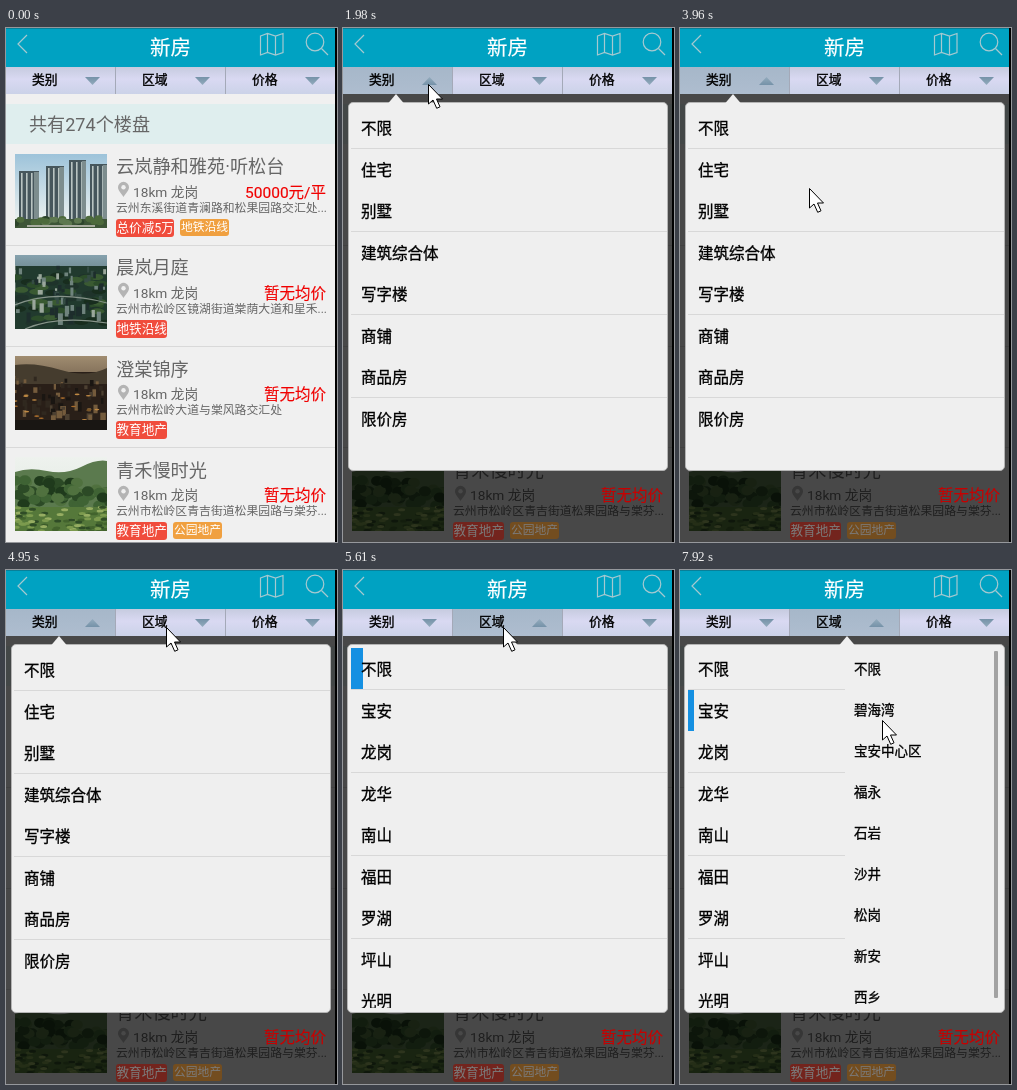
An HTML page for the animation above (8000 ms loop, 331x514 px).

```html
<!DOCTYPE html>
<html lang="zh-CN">
<head>
<meta charset="utf-8">
<title>新房</title>
<style>
html, body { margin: 0; width: 100%; height: 100%; overflow: hidden; }
#stage {
  position: absolute; left: 0; top: 0; width: 331px; height: 514px; overflow: hidden;
  background: #f0f0f0; color: #666;
  font-family: Roboto, "Noto Sans CJK SC", "Noto Sans CJK", sans-serif;
}
#stage * { box-sizing: border-box; }
#stage div, #stage svg, #stage span { position: absolute; }
.t { line-height: 20px; white-space: nowrap; }
.anim, .tab::before, .menu, .sub, .mark, .region li::after { animation: 8s step-end infinite; }

.head { left: 0; top: 0; width: 331px; height: 39px; background: #00a2c2; border-top: 1px solid #087f98; }
.head .t { left: 144px; top: 9px; font-size: 20.5px; color: #fff; -webkit-text-stroke: .2px; }
.head svg { left: 0; top: -1px; fill: none; stroke: #a6c9d0; stroke-width: 1.2; }

.tab { top: 39px; height: 27px; background: linear-gradient(#c6cbdf, #d9d9f2 45%, #cbd2e8); border-right: 1px solid #a4a9b8; }
.tab::before { content: ""; position: absolute; inset: 0; background: linear-gradient(#a6b7c9, #aebdcf); opacity: 0; }
.tab .t { left: 26px; top: 3px; font-size: 12.8px; color: #000; -webkit-text-stroke: .35px; }
.tab i { position: absolute; left: 79px; top: 10px; width: 15px; height: 8px; background: linear-gradient(#7592a8, #93abbd); clip-path: polygon(0 0, 100% 0, 50% 100%); }
.tab1::before { animation-name: press1; }
.tab1 i { animation-name: flip1; }
.tab2::before { animation-name: press2; }
.tab2 i { animation-name: flip2; }
@keyframes press1 { 0%, 66% { opacity: 0 } 16.5% { opacity: 1 } }
@keyframes press2 { 0% { opacity: 0 } 66% { opacity: 1 } }
@keyframes flip1 { 0%, 66% { transform: none } 20.625% { transform: scaleY(-1) } }
@keyframes flip2 { 0% { transform: none } 66% { transform: scaleY(-1) } }

.count { left: 0; top: 76px; width: 329px; height: 40px; background: #dfeeee; }
.count .t { left: 23px; top: 11px; font-size: 18.1px; }

.row { left: 0; width: 329px; height: 101.3px; border-bottom: 1px solid #d9d9d9; }
.photo { left: 9px; top: 9px; width: 92px; height: 74px; }
.name { left: 110px; top: 12.5px; font-size: 18.2px; }
.pin { left: 111px; top: 36.5px; }
.dist { left: 127px; top: 37px; font-size: 13.7px; }
.addr { left: 110px; top: 53px; font-size: 11.86px; }
.hot { z-index: 2; }
.price { --shade: .83; right: 9px; top: 38px; font-size: 15.5px; color: #f00000; -webkit-text-stroke: .15px; }
.tags { --shade: .48; left: 110px; top: 74px; display: flex; gap: 6px; }
#stage .tags span { position: static; height: 18px; line-height: 18px; padding: 0 .5px; border-radius: 3px; font-size: 12.6px; color: #fff; background: #f04c3c; white-space: nowrap; }
#stage .tags span + span { height: 17px; line-height: 17px; font-size: 11.8px; background: #f0a040; }
.row3 .hot { animation-name: hot3; }
.row4 .hot { animation-name: hot4; }
@keyframes hot3 { 0% { filter: none } 24.75% { filter: brightness(var(--shade)) } }
@keyframes hot4 { 0%, 66% { filter: none } 24.75%, 70.125% { filter: brightness(var(--shade)) } }

.dim { left: 0; top: 66px; width: 329px; height: 0; z-index: 1; background: rgba(0, 0, 0, .7); animation-name: dim; }
@keyframes dim { 0% { height: 0 } 24.75%, 70.125% { height: 448px } 66% { height: 345px } }

.menu { left: 0; top: 66px; width: 329px; height: 448px; z-index: 3; opacity: 0; transform-origin: 0 0; }
.panel { left: 5px; top: 8px; width: 320px; height: 369px; background: #efefef; border: 1px solid #b4b4b4; border-radius: 5px; }
.tip { top: 0; width: 16px; height: 9.5px; background: #efefef; clip-path: polygon(50% 0, 100% 100%, 0 100%); }
.menu ul { position: absolute; left: 8px; top: 13px; width: 316px; height: 360px; margin: 0; padding: 0; list-style: none; overflow: hidden; }
.menu li { position: relative; height: 41.5px; line-height: 44.5px; padding-left: 10px; font-size: 15.5px; color: #000; -webkit-text-stroke: .3px; }
.menu li::after { position: absolute; left: 0; bottom: 0; width: 316px; height: 1px; background: #d8d8d8; }
.open li:nth-child(odd)::after { content: ""; }
.squash li:nth-child(n+2):nth-child(-n+5)::after { content: ""; }
.kind { animation-name: kind; }
.squash { animation-name: squash; transform: scaleY(.77); }
.region { animation-name: region; }
.region .panel { left: 4px; width: 321px; }
.region ul { top: 12px; }
.region li::after { animation-name: narrow; }
.region .mark { left: 8px; top: 12px; width: 12px; height: 41px; background: #1590e2; animation-name: mark; }
.region .sub { left: 0; top: 0; width: 329px; height: 448px; opacity: 0; animation-name: sub; }
.sub ul { left: 165px; width: 149px; }
.sub li { height: 41px; line-height: 43px; padding-left: 9px; font-size: 13.5px; }
#stage .sub li::after { content: none; }
.bar { left: 314px; top: 15px; width: 4px; height: 347px; border-radius: 1px; background: #a2a2a2; }
@keyframes kind { 0%, 66% { opacity: 0 } 24.75% { opacity: 1 } }
@keyframes squash { 0%, 70.125% { opacity: 0 } 66% { opacity: 1 } }
@keyframes region { 0% { opacity: 0 } 70.125% { opacity: 1 } }
@keyframes sub { 0% { opacity: 0 } 86.625% { opacity: 1 } }
@keyframes narrow { 0% { width: 316px } 86.625% { width: 157px } }
@keyframes mark { 0% { top: 12px; width: 12px } 86.625% { top: 54px; width: 6px } }

.edge { right: 0; top: 0; width: 2px; height: 514px; z-index: 4; background: #000; }
.cursor { left: 0; top: 0; z-index: 5; overflow: visible; animation-name: cursor; }
@keyframes cursor {
  0% { transform: translate(-40px, -40px) }
  8.25% { transform: translate(58px, 44px) }
  12.375% { transform: translate(85px, 56px) }
  28.875% { transform: translate(155px, 68px) }
  33% { transform: translate(160px, 65px) }
  37.125% { transform: translate(139px, 61px) }
  41.25% { transform: translate(176px, 79px) }
  45.375% { transform: translate(174px, 205px) }
  49.5% { transform: translate(129px, 160px) }
  53.625% { transform: translate(112px, 254px) }
  57.75% { transform: translate(96px, 65px) }
  61.875% { transform: translate(160px, 57px) }
  74.25% { transform: translate(127px, 102px) }
  78.375% { transform: translate(88px, 132px) }
  82.5% { transform: translate(74px, 144px) }
  90.75% { transform: translate(82px, 154px) }
  94.875% { transform: translate(202px, 143px) }
  99% { transform: translate(202px, 150px) }
}
</style>
</head>
<body>
<div id="stage">
  <div class="head">
    <span class="t">新房</span>
    <svg width="331" height="38">
      <path d="M21 7l-9 9 9 9"/>
      <path d="M254.500 8l7-2.500 8 2.500 7.500-2.500v19l-7.500 2.500-8-2.500-7 2.500zM261.500 5.500v19M269.500 8v19"/>
      <circle cx="309" cy="14" r="8.800"/><path d="M315.500 20.500l6.500 6.500"/>
    </svg>
  </div>
  <div class="count"><span class="t">共有274个楼盘</span></div>
  <div class="dim anim"></div>
  <div class="edge"></div>
  <svg class="cursor anim" width="16" height="26">
    <path d="M.5 .5V20L5 16l3.700 8.300 3.300-1.500L8.500 15H14.500z" fill="#fff" stroke="#000"/>
  </svg>
</div>
<script>
const stage = document.getElementById('stage');
const add = html => stage.insertAdjacentHTML('beforeend', html);

// Seeded scatter of small shapes
function scatter(n, seed, shape) {
  const rnd = () => (seed = (seed * 16807) % 2147483647) / 2147483647;
  let out = '';
  for (let i = 0; i < n; i++) out += shape(rnd, i / n);
  return out;
}
const rect = (x, y, w, h, fill) => `<rect x="${x}" y="${y}" width="${w}" height="${h}" fill="${fill}"/>`;
const blob = (x, y, rx, ry, fill) => `<ellipse cx="${x}" cy="${y}" rx="${rx}" ry="${ry}" fill="${fill}"/>`;
const pick = (list, r) => list[Math.floor(r() * list.length)];
const sky = (id, top, low) => `<linearGradient id="${id}" x2="0" y2="1"><stop stop-color="${top}"/>
  <stop offset="1" stop-color="${low}"/></linearGradient>` + rect(0, 0, 92, 74, `url(#${id})`);

// A dark block with pale vertical balcony strips
function tower(x, y, w) {
  let out = rect(x, y, w, 68 - y, '#46565c');
  for (let i = 2; i < w - 2; i += 5) out += rect(x + i, y + 2, 1.6, 66 - y, '#b9c4c2');
  return out + rect(x + w * .75, y + 1, w * .25, 67 - y, '#7d8d8e');
}
const town = (n, seed, tones, y0) => scatter(n, seed, (r, k) => {
  const y = y0 + k * (66 - y0), s = .5 + k;
  return rect(r() * 92 - 3, y - 4 * s, 2 + 3 * s * r(), 3 + 6 * s * r(), pick(tones, r));
});
const leaves = (n, seed, y, h, rx, ry, tones) =>
  scatter(n, seed, r => blob(r() * 92, y + r() * h, rx, ry, pick(tones, r)));

const photos = [
  sky('s1', '#9dc3da', '#f4f6f2') + tower(4, 17, 20) + tower(31, 12, 18) + tower(54, 6, 17) + tower(75, 10, 17) +
    rect(0, 65, 92, 9, '#3d5537') + leaves(24, 7, 64, 6, 4, 3, ['#2c442b', '#4d6a3c', '#5e7850']) +
    rect(12, 71, 68, 2, '#a9ada0'),
  sky('s2', '#86a2ae', '#20342a') + rect(0, 11, 92, 63, '#213a2e') +
    leaves(55, 31, 18, 56, 7, 3, ['#182d1e', '#2c4c2a', '#1f332b', '#3a5a32']) +
    town(60, 91, ['#6f837d', '#354c44', '#9aa79b', '#1d2d2c'], 12) +
    '<path d="M0 50Q40 34 92 48M10 74Q42 60 92 68" fill="none" stroke="#87948a" stroke-width="1.200"/>',
  sky('s3', '#a08c70', '#2b2018') + rect(0, 16, 92, 58, '#291f18') +
    '<path d="M0 9Q20 6 46 14T92 12V28H0z" fill="#453c2e"/>' +
    town(60, 53, ['#4c4031', '#745b3c', '#1a1612', '#30281f'], 22) +
    leaves(18, 17, 38, 30, 2.5, .8, ['#a86c2c', '#7a5628', '#c08a44']) +
    rect(0, 64, 92, 10, '#191613'),
  sky('s4', '#eef2ee', '#dce7dc') + '<path d="M0 15Q14 10 32 14T66 10T92 4V74H0z" fill="#5b7a4e"/>' +
    leaves(60, 23, 23, 26, 6, 5, ['#2c4a26', '#3f6334', '#1f3a1c', '#50713f']) +
    rect(0, 50, 92, 24, '#55783a') +
    leaves(80, 41, 50, 25, 3.5, 1.5, ['#7c9a4e', '#42632d', '#96ad62', '#2f4c26'])
];

const rows = [
  ['云岚静和雅苑·听松台', '50000元/平', '云州东溪街道青澜路和松果园路交汇处...', '总价减5万', '地铁沿线'],
  ['晨岚月庭', '暂无均价', '云州市松岭区镜湖街道棠荫大道和星禾...', '地铁沿线'],
  ['澄棠锦序', '暂无均价', '云州市松岭大道与棠风路交汇处', '教育地产'],
  ['青禾慢时光', '暂无均价', '云州市松岭区青吉街道松果园路与棠芬...', '教育地产', '公园地产']
];
rows.forEach(([name, price, addr, ...tags], i) => add(`
  <div class="row row${i + 1}" style="top:${116.5 + i * 101.3}px">
    <svg class="photo" viewBox="0 0 92 74">${photos[i]}</svg>
    <span class="t name">${name}</span>
    <svg class="pin" width="13" height="17"><path d="M6.500 16C4 12 1 9.500 1 6.300a5.500 5.500 0 0 1 11 0C12 9.500 9 12 6.500 16z" fill="#b4b4b4"/><circle cx="6.500" cy="6.300" r="2.200" fill="#f0f0f0"/></svg>
    <span class="t dist">18km 龙岗</span>
    <span class="t price hot anim">${price}</span>
    <span class="t addr">${addr}</span>
    <div class="tags hot anim">${tags.map(t => `<span>${t}</span>`).join('')}</div>
  </div>`));

['类别', '区域', '价格'].forEach((label, i) => add(`
  <div class="tab tab${i + 1}" style="left:${i * 110}px;width:110px">
    <span class="t">${label}</span><i class="anim"></i>
  </div>`));

const list = names => `<ul>${names.split(' ').map(n => `<li>${n}</li>`).join('')}</ul>`;
const menu = (cls, tip, names, under = '', over = '') => add(`
  <div class="menu ${cls}">
    <div class="panel"></div><div class="tip" style="left:${tip - 8}px"></div>
    ${under}${list(names)}${over}
  </div>`);

const kinds = '不限 住宅 别墅 建筑综合体 写字楼 商铺 商品房 限价房';
menu('kind open', 53, kinds);
menu('squash', 53, kinds);
menu('region open', 167, '不限 宝安 龙岗 龙华 南山 福田 罗湖 坪山 光明',
  '<div class="mark"></div>',
  `<div class="sub">${list('不限 碧海湾 宝安中心区 福永 石岩 沙井 松岗 新安 西乡')}<div class="bar"></div></div>`);
</script>
</body>
</html>
```
